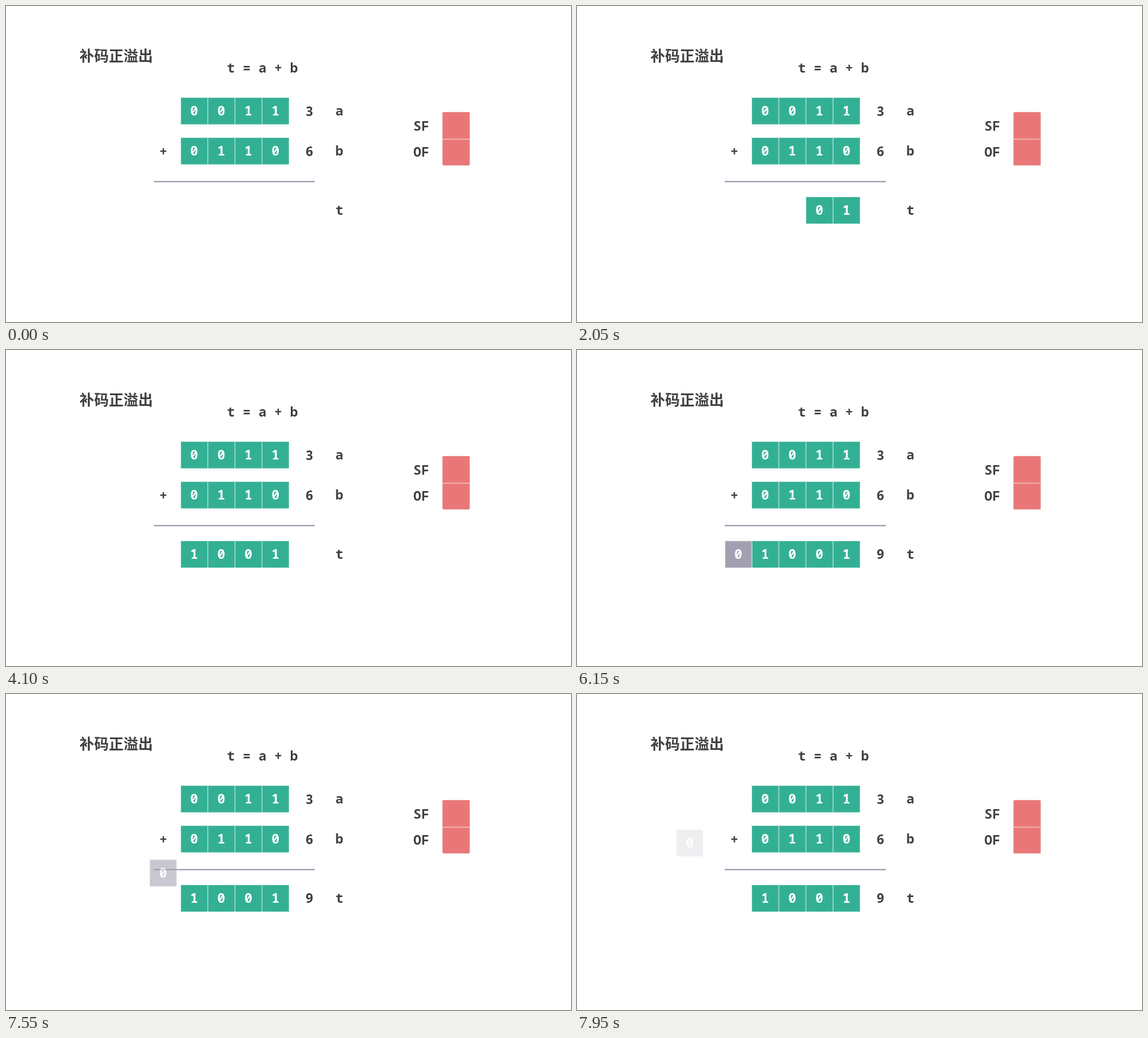
An HTML page with a canvas for the animation above (7990 ms loop, 1000 by 560 pixels).

```html
<!DOCTYPE html>
<html lang="zh">
<head>
<meta charset="utf-8">
<style>
html, body { margin: 0; width: 100%; height: 100%; overflow: hidden; background: #fff; }
canvas { display: block; }
</style>
</head>
<body>
<canvas id="stage" width="1000" height="560"></canvas>
<script>
const ctx = document.getElementById('stage').getContext('2d');
const LOOP = 7990, STEP = 40, LEAVE = 7150;
const SIZE = 48, LEFT = 309;
const GREEN = '#33b094', GREY = '#a2a0b0', RED = '#ea7777', INK = '#404040';
const MONO = 'bold 23.3px "Noto Sans Mono", "DejaVu Sans Mono", monospace';
const HAN = 'bold 26px "Noto Sans CJK SC", "Noto Sans CJK", sans-serif';

function text(c, str, x, y, color = INK, align = 'center', font = MONO) {
  c.font = font;
  c.fillStyle = color;
  c.textAlign = align;
  c.fillText(str, x, y);
}

function cell(c, x, y, digit, color) {
  c.fillStyle = color;
  c.fillRect(x, y, SIZE, SIZE);
  c.strokeStyle = 'rgba(255,255,255,0.6)';
  c.lineWidth = 1;
  c.strokeRect(x + 0.5, y + 0.5, SIZE - 0.5, SIZE - 0.5);
  text(c, digit, x + 24, y + 32.3, '#fff');
}

function row(bits, y, from = 0) {
  for (let i = from; i < 4; i++) cell(ctx, LEFT + i * SIZE, y, bits[i], GREEN);
}

// The carry is a sprite so that box and digit fade as one.
const carry = document.createElement('canvas');
carry.width = carry.height = SIZE + 1;
cell(carry.getContext('2d'), 0, 0, '0', GREY);

const clamp = v => Math.min(1, Math.max(0, v));
const ease = p => p < 0.5 ? 2 * p * p : 1 - 2 * (1 - p) * (1 - p);
const bezier = (u, b, c, d) =>
  3 * u * (1 - u) ** 2 * b + 3 * u * u * (1 - u) * c + u ** 3 * d;

function drawCarry(t) {
  let dx = 0, dy = 0, alpha = 1;
  if (t >= LEAVE) {
    const now = LEAVE + Math.floor((t - LEAVE) / STEP) * STEP;
    const u = ease(clamp((now - 7192) / 985));
    dx = -bezier(u, 0, 35.7, 108);
    dy = -bezier(u, 64.5, 99.25, 99.25);
    alpha = 1 - clamp((now - 7130) / 1000);
  }
  ctx.globalAlpha = alpha;
  ctx.drawImage(carry, LEFT - SIZE + 0.5 + dx, 338 + dy);
  ctx.globalAlpha = 1;
}

function flag(name, y, h, radii, base) {
  text(ctx, name, 721, base, INK, 'left');
  ctx.beginPath();
  ctx.roundRect(772.5, y, 48.3, h, radii);
  ctx.fillStyle = RED;
  ctx.fill();
  ctx.strokeStyle = 'rgba(225,190,190,0.6)';
  ctx.lineWidth = 0.8;
  ctx.stroke();
}

function draw(t) {
  ctx.fillStyle = '#fff';
  ctx.fillRect(0, 0, 1000, 560);

  text(ctx, '补码正溢出', 130, 97.5, INK, 'left', HAN);
  text(ctx, 't = a + b', 391, 118, INK, 'left');

  row('0011', 162);
  text(ctx, '3', 537, 194.8);
  text(ctx, 'a', 590, 194.3);

  row('0110', 233);
  text(ctx, '6', 537, 265.5);
  text(ctx, 'b', 590, 264.5);
  text(ctx, '+', 278.5, 265.5);

  flag('SF', 188, 48, [2, 2, 0, 0], 220.5);
  flag('OF', 236, 46.5, [0, 0, 2, 2], 267.3);
  ctx.fillStyle = '#f3d3d3';
  ctx.fillRect(773, 235.6, 47.5, 1);

  ctx.fillStyle = '#a29fb3';
  ctx.fillRect(261.5, 310, 285, 2.4);
  text(ctx, 't', 590, 370.3);

  const shown = [1050, 2050, 3100, 4100].filter(at => t >= at).length;
  row('1001', 338, 4 - shown);
  if (t >= 6150) text(ctx, '9', 537, 370.3);
  if (t >= 5100) drawCarry(t);
}

const start = performance.now();
function tick() {
  draw((performance.now() - start) % LOOP);
  requestAnimationFrame(tick);
}
tick();
</script>
</body>
</html>
```
